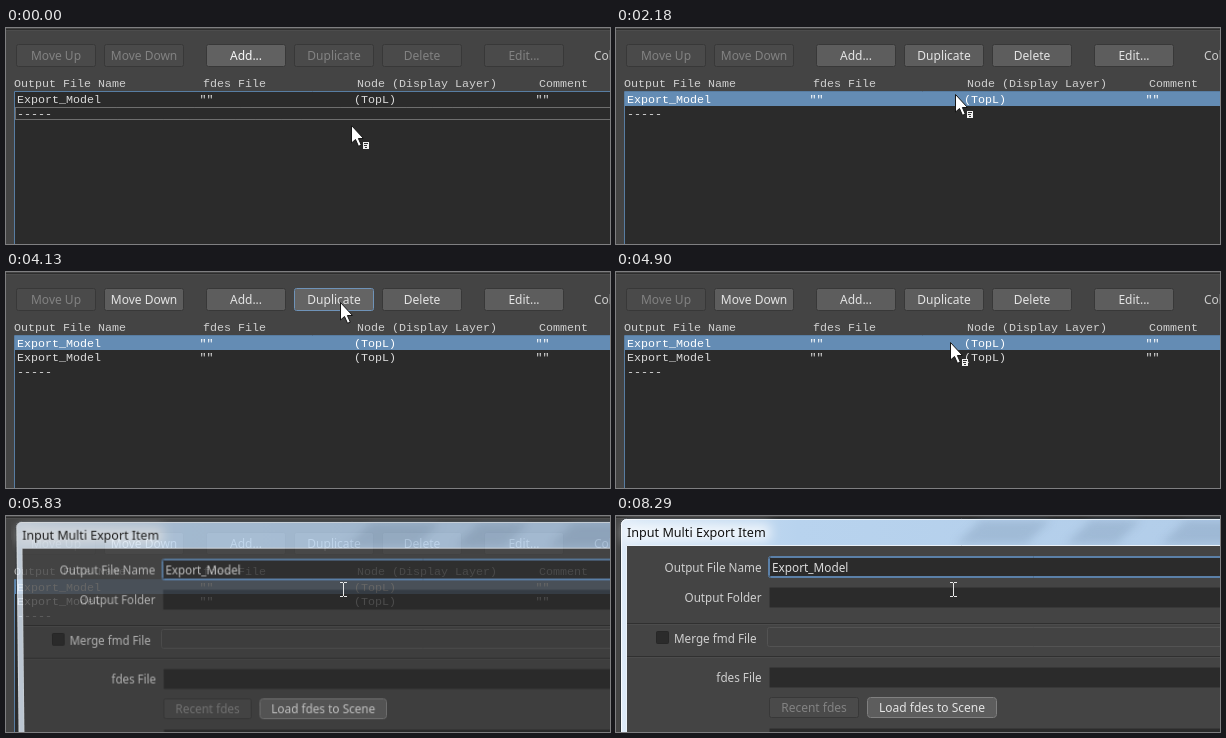
Write an HTML page with a canvas that moves like this. It is 604 by 216 pixels and loops after 8.42 s.

```html
<!DOCTYPE html>
<html lang="en">
<head>
<meta charset="utf-8">
<title>Export item dialog</title>
<style>
  html, body { margin: 0; width: 100%; height: 100%; overflow: hidden; background: #444; }
  canvas { display: block; width: 604px; height: 216px; }
</style>
</head>
<body>
<canvas id="stage" width="604" height="216"></canvas>
<script>
const W = 604, H = 216, LOOP = 8420;
const stage = document.getElementById('stage').getContext('2d');
const UI = '"Noto Sans", "Open Sans", sans-serif';
const MONO = '11.67px "Liberation Mono", monospace';

// Pointer tip: time, x, y; each place holds until the next time.
const PATH = [
  [0, 345, 97], [770, 345, 95], [900, 344, 88], [1020, 342, 79], [1150, 340, 72], [1280, 339, 70],
  [2180, 339, 66], [2310, 338, 57], [2440, 337, 49], [2560, 337, 44],
  [2710, 336, 38], [2840, 335, 33], [2960, 335, 30], [3230, 334, 30],
  [4260, 334, 36], [4380, 334, 46], [4510, 334, 56], [4640, 334, 64], [4770, 334, 69], [4900, 334, 70]
];
const ARROW = [[0, 0], [0, 17.5], [4, 14], [7, 20.8], [9.8, 19.6], [6.9, 13], [12, 13]];

const lerp = (a, b, k) => a + (b - a) * k;
// Two-step fade: half at the first time, full at the second.
const fade = (t, a, b) => t < a ? 0 : t < b ? 0.5 : 1;
const grey = v => `rgb(${v},${v},${v})`;

function box(c, x, y, w, h, fill, edge, r = 0) {
  c.beginPath();
  c.roundRect(x + 0.5, y + 0.5, w - 1, h - 1, r);
  c.fillStyle = fill;
  c.fill();
  c.strokeStyle = edge;
  c.lineWidth = 1;
  c.stroke();
}

function text(c, s, x, y, color, font, align = 'left') {
  c.font = font;
  c.fillStyle = color;
  c.textAlign = align;
  c.fillText(s, x, y);
}

function button(c, s, x, y, w, h, on, hover = 0) {
  box(c, x, y, w, h, grey(lerp(74, 93, on) + 7 * hover), '#383838', 2);
  if (hover) {
    c.globalAlpha = hover;
    box(c, x, y, w, h, 'transparent', '#6f93b8', 2);
    c.globalAlpha = 1;
  }
  text(c, s, x + w / 2, y + h / 2 + 4.5, grey(lerp(130, 228, on)), `12px ${UI}`, 'center');
}

function header(c) {
  [['Output File Name', 8], ['fdes File', 197], ['Node (Display Layer)', 351], ['Comment', 533]]
    .forEach(([s, x]) => text(c, s, x, 59, '#d0d0d0', MONO));
}

function item(c, y, color) {
  [['Export_Model', 11], ['""', 193.5], ['(TopL)', 348], ['""', 529.5]]
    .forEach(([s, x]) => text(c, s, x, y, color, MONO));
}

function selectedRow(c, alpha = 1) {
  c.globalAlpha = alpha;
  c.fillStyle = '#648cb4';
  c.fillRect(9, 64, W, 14);
  c.globalAlpha = 1;
  item(c, 75, '#fff');
}

function drawList(c, t) {
  const picked = fade(t, 1680, 1800), copied = fade(t, 3500, 3620);
  const hover = t < 4260 ? fade(t, 2840, 2960) : t < 4380 ? 0.5 : 0;
  c.fillStyle = '#444';
  c.fillRect(0, 0, W, H);
  c.fillStyle = '#2c2c2c';
  c.fillRect(0, 1, W, 1);
  c.fillStyle = '#4c4c4c';
  c.fillRect(0, 2, W, 1);

  button(c, 'Move Up', 10, 16, 80, 23, 0);
  button(c, 'Move Down', 98, 16, 80, 23, copied);
  button(c, 'Add...', 200, 16, 80, 23, picked ? 1 : 1.2);
  button(c, 'Duplicate', 288, 16, 80, 23, picked, hover);
  button(c, 'Delete', 376, 16, 80, 23, picked);
  button(c, 'Edit...', 478, 16, 80, 23, picked);
  text(c, 'Colu', 588, 32, '#ccc', `12px ${UI}`);

  header(c);
  box(c, 8, 63, W, H, '#2b2b2b', '#587da2');
  if (picked) selectedRow(c);
  else item(c, 75, '#dcdcdc');
  if (copied) item(c, 89, '#dcdcdc');
  text(c, '-----', 11, copied ? 103 : 89, '#dcdcdc', MONO);
  if (!picked) {
    c.setLineDash([1, 1]);
    c.strokeStyle = '#b0b0b0';
    c.lineWidth = 1;
    c.strokeRect(9.5, 79.5, W, 12);
    c.setLineDash([]);
  }
}

function glassFrame(c, w) {
  const glass = c.createLinearGradient(0, 0, W, 0);
  [[0, '#e2edf9'], [0.04, '#d3e4f5'], [0.3, '#b8d3ee'], [1, '#b2cde9']]
    .forEach(([k, color]) => glass.addColorStop(k, color));
  box(c, 4, 2, w + 20, H + 60, glass, '#2d3338', 6);

  // Soft slanted reflections on the title bar.
  c.save();
  c.filter = 'blur(4px)';
  c.fillStyle = 'rgba(110,135,160,.28)';
  [[340, 70], [450, 50], [545, 90]].forEach(([x, span]) => {
    c.beginPath();
    c.moveTo(x + 25, 4);
    c.lineTo(x + span + 25, 4);
    c.lineTo(x + span, 28);
    c.lineTo(x, 28);
    c.fill();
  });
  c.restore();

  c.strokeStyle = 'rgba(255,255,255,.75)';
  c.beginPath();
  c.roundRect(5.5, 3.5, w + 20, H + 60, 5);
  c.stroke();

  c.save();
  c.filter = 'blur(6px)';
  c.fillStyle = 'rgba(255,255,255,.75)';
  c.fillRect(8, 8, 146, 17);
  c.restore();
  text(c, 'Input Multi Export Item', 11, 21, '#111', `12.6px ${UI}`);
}

function drawDialog(c, w) {
  const label = (s, y) => text(c, s, 145.5, y, '#cfcfcf', `11.7px ${UI}`, 'right');
  const field = (y, edge) => box(c, 153, y, w, 21, '#2b2b2b', edge, 1);
  const rule = y => {
    c.fillStyle = '#303030';
    c.fillRect(11, y, w, 1);
    c.fillStyle = '#4c4c4c';
    c.fillRect(11, y + 1, w, 1);
  };

  glassFrame(c, w);
  box(c, 10, 29, w + 20, H + 60, '#444', '#eaf2fa');

  label('Output File Name', 55.5);
  box(c, 152, 40, w, 22, '#2b2b2b', '#5b80a8', 2);
  box(c, 153, 41, w, 20, '#2b2b2b', '#5b80a8', 1);
  text(c, 'Export_Model', 156, 55.5, '#dcdcdc', `11.8px ${UI}`);
  label('Output Folder', 86);
  field(71, '#383838');
  rule(107);
  box(c, 40, 115, 13, 13, '#2b2b2b', '#272727', 1);
  text(c, 'Merge fmd File', 58, 126.5, '#cfcfcf', `11.7px ${UI}`);
  box(c, 151, 111, w, 20, '#434343', '#535353', 2);
  rule(140);
  label('fdes File', 165.5);
  field(151, '#383838');
  button(c, 'Recent fdes', 153, 181, 90, 21, 0);
  button(c, 'Load fdes to Scene', 251, 181, 130, 21, 1);
  box(c, 251, 181, 130, 21, 'transparent', '#808080', 3);
  field(212, '#383838');
}

function drawArrow(c, x, y) {
  c.beginPath();
  ARROW.forEach(([dx, dy]) => c.lineTo(x + 0.5 + dx, y + 0.5 + dy));
  c.closePath();
  c.fillStyle = '#fff';
  c.fill();
  c.strokeStyle = '#161616';
  c.lineWidth = 1;
  c.stroke();
  if (y < 50) return;
  c.fillStyle = '#f2f2f2';
  c.fillRect(x + 12, y + 17, 6, 7);
  c.fillStyle = '#333';
  c.fillRect(x + 13, y + 18, 4, 1);
  c.fillRect(x + 13, y + 20, 3, 1);
  c.fillRect(x + 14, y + 22, 2, 1);
}

function drawBeam(c) {
  c.fillStyle = '#e8e8e8';
  c.fillRect(337, 67, 1, 13);
  [66, 80].forEach(y => {
    c.fillRect(334, y, 3, 1);
    c.fillRect(338, y, 3, 1);
  });
}

const wide = 680;
const sheet = document.createElement('canvas');
sheet.width = wide;
sheet.height = 240;
drawDialog(sheet.getContext('2d'), wide);

// Tilted opening of the window: lower rows are narrower; p = 1 is flat.
function tiltDialog(c, p, alpha) {
  const vs = lerp(0.966, 1, p), shift = lerp(27, 16, p);
  c.globalAlpha = alpha;
  for (let y = 0; y < H; y++) {
    const sy = 16 + (y - shift) / vs;
    if (sy < 0) continue;
    const s = lerp(lerp(0.945, 0.92, y / H), 1, p);
    c.drawImage(sheet, 0, sy, wide, 1, 381 * (1 - s), y, wide * s, 1);
  }
  c.globalAlpha = 1;
}

function draw(t) {
  const c = stage;
  drawList(c, t);
  if (t < 5680) {
    const [, x, y] = PATH.findLast(k => k[0] <= t);
    drawArrow(c, x, y);
  } else if (t < 5830) {
    c.fillStyle = 'rgba(54,57,60,.6)';
    c.fillRect(8, 15, W, H);
    tiltDialog(c, 0, 0.24);
    header(c);
    selectedRow(c, 0.5);
    drawArrow(c, 334, 70);
  } else if (t < 5950) {
    tiltDialog(c, 0.75, 0.82);
    drawBeam(c);
  } else {
    c.drawImage(sheet, 0, 0);
    drawBeam(c);
    const caretOn = t < 6200 || Math.floor((t - 6200) / 522.5) % 2 === 1;
    if (caretOn) {
      c.fillStyle = '#e0e0e0';
      c.fillRect(231, 44, 1, 14);
    }
  }
}

const start = performance.now();
function tick() {
  draw((performance.now() - start) % LOOP);
  requestAnimationFrame(tick);
}
tick();
</script>
</body>
</html>
```
